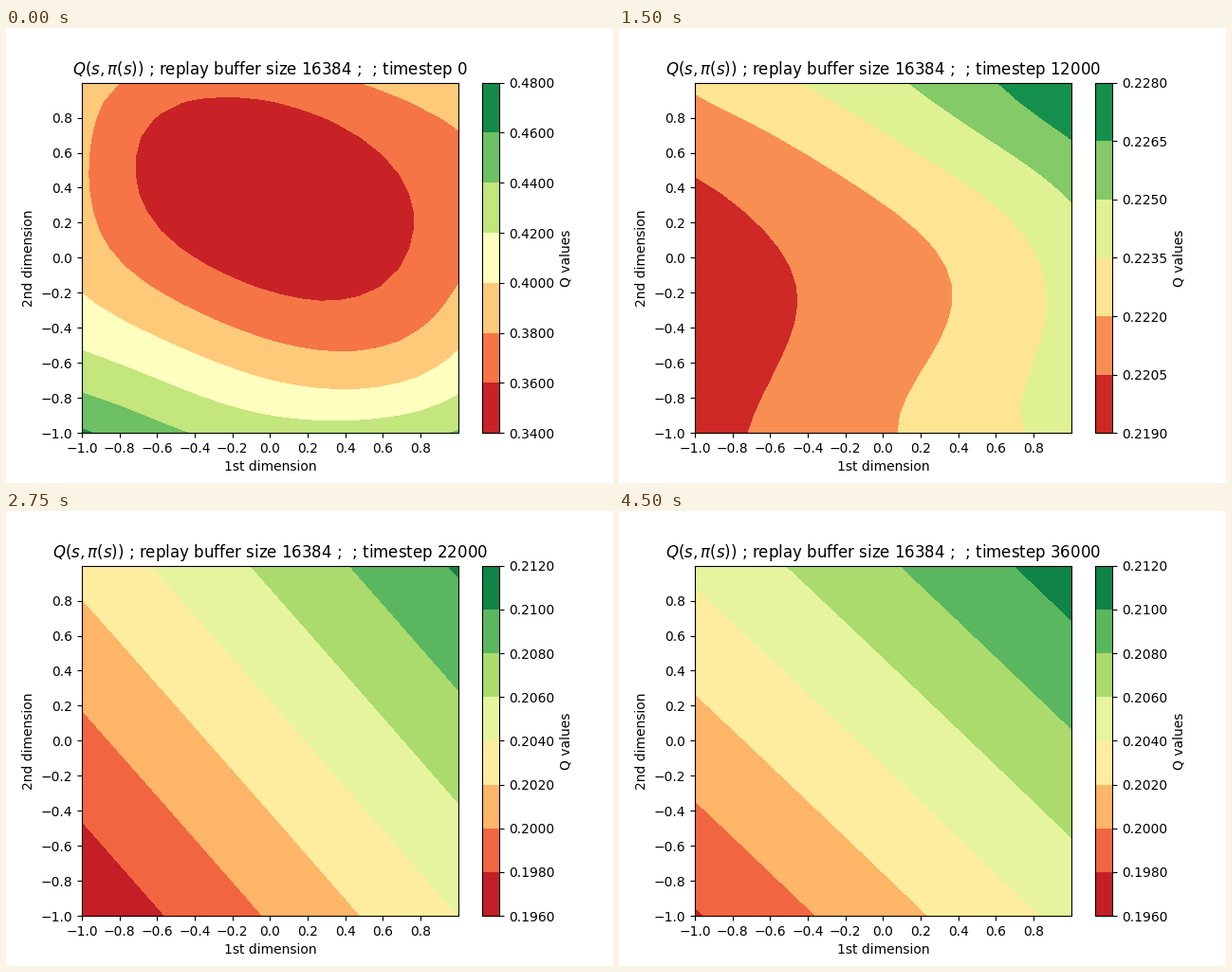
These frames come from a looping animation (640 by 480 pixels, 4.75 s). A matplotlib script:

```python
import numpy as np
import matplotlib.pyplot as plt
from matplotlib.animation import FuncAnimation

FRAMES = 19
INTERVAL = 250
STEPS_PER_FRAME = 2000
TICKS = np.arange(-10, 10, 2) / 10

axis = np.linspace(-1, 1, 20)
fig = plt.figure(figsize=(6.4, 4.8), dpi=100)


def basis(count):
    """Lagrange polynomials over evenly spaced nodes, sampled on the axis."""
    nodes = np.linspace(-1, 1, count)
    return np.vander(axis, count) @ np.linalg.inv(np.vander(nodes, count))


def surface(*rows):
    """Smooth polynomial surface through key heights, bottom row first."""
    heights = np.array(rows)
    n_rows, n_cols = heights.shape
    return basis(n_rows) @ heights @ basis(n_cols).T


# Q surfaces at a few moments of training; the rest is blended.
checkpoints = {
    0: surface((0.4625, 0.437, 0.428, 0.4415),
               (0.407, 0.3797, 0.365, 0.388),
               (0.384, 0.345, 0.3455, 0.372),
               (0.393, 0.367, 0.376, 0.3926)),
    2: surface((0.2948, 0.2863, 0.2845, 0.2879),
               (0.2605, 0.251, 0.2492, 0.254),
               (0.2355, 0.2265, 0.2255, 0.238),
               (0.2245, 0.2235, 0.229, 0.244)),
    6: surface((0.22, 0.2212, 0.22253, 0.2241),
               (0.2196, 0.2208, 0.2221, 0.2241),
               (0.2196, 0.2208, 0.22205, 0.2242),
               (0.2206, 0.22185, 0.2235, 0.2257),
               (0.2222, 0.22375, 0.2256, 0.22795)),
    8: surface((0.2056, 0.20813, 0.2106),
               (0.20754, 0.20988, 0.21265),
               (0.21, 0.21245, 0.21505)),
    11: surface((0.1963, 0.204), (0.2026, 0.2102)),
    13: surface((0.1905, 0.1982), (0.19675, 0.20425)),
    18: surface((0.19784, 0.20455), (0.2044, 0.211)),
}


def q_values(index):
    """Blend the checkpoints on both sides of the frame."""
    before = max(k for k in checkpoints if k <= index)
    after = min(k for k in checkpoints if k >= index)
    t = (index - before) / max(after - before, 1)
    return (1 - t) * checkpoints[before] + t * checkpoints[after]


def draw(index):
    fig.clear()
    ax = fig.add_subplot()
    filled = ax.contourf(axis, axis, q_values(index), cmap="RdYlGn")
    bar = fig.colorbar(filled, ax=ax, ticks=filled.levels, format="%.4f")
    bar.set_label("Q values")
    ax.set(xlim=(-1, 1), ylim=(-1, 1), xticks=TICKS, yticks=TICKS,
           xlabel="1st dimension", ylabel="2nd dimension")
    ax.set_title(r"$Q(s, \pi(s))$ ; replay buffer size 16384 ;  ; "
                 f"timestep {index * STEPS_PER_FRAME}")
    return []


anim = FuncAnimation(fig, draw, frames=FRAMES, interval=INTERVAL,
                     repeat=True, repeat_delay=0, blit=False)
plt.show()
```
